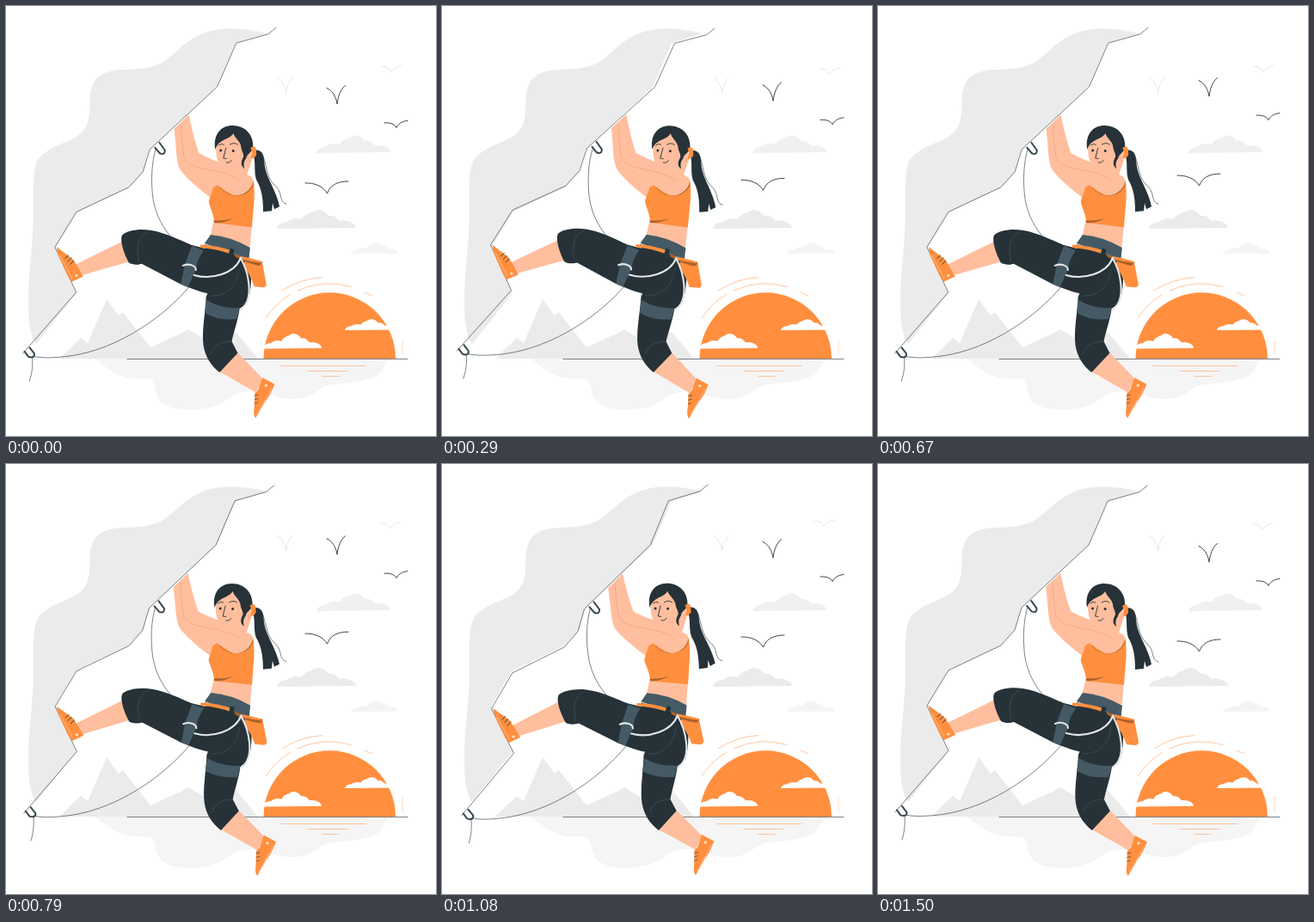
An HTML page for the animation above (1.54 s loop, 500 px wide and 500 px high).

```html
<!DOCTYPE html>
<html lang="en">
<head>
<meta charset="utf-8">
<title>Climber at sunset</title>
<style>
html, body { margin: 0; width: 100%; height: 100%; overflow: hidden; background: #fff; }
svg { display: block; width: 100vw; height: 100vh; }
.line { fill: none; stroke: #263238; stroke-width: .6; stroke-linecap: round; stroke-linejoin: round; }
.bold { stroke-width: .9; }
.pale { stroke: #cfcfcf; stroke-width: .5; }
.glow { fill: none; stroke: #ff8f3f; stroke-width: .5; stroke-linecap: round; }
.skin { fill: #ffbe9d; }
.crease { fill: none; stroke: #e09a78; stroke-width: .5; stroke-linecap: round; }
.dark { fill: #263238; }
.slate { fill: #455a64; }
.orange { fill: #ff8f3f; }
.brown { fill: #ad6128; }
.strap { fill: none; stroke: #e3e6e8; stroke-width: 2.1; stroke-linecap: round; }
.clip { fill: none; stroke: #37474f; stroke-width: 2; stroke-linecap: round; stroke-linejoin: round; }
</style>
</head>
<body>
<svg viewBox="0 0 500 500" xmlns="http://www.w3.org/2000/svg">
  <defs>
    <path id="cloud" d="M0,0 C1,-4 5,-8 12,-8 C17,-12 22,-13 29,-11 C32,-18 38,-17 42,-20 C48,-24 56,-21 60,-15 C67,-16 70,-12 73,-9 C82,-11 92,-6 92,-1 Z"/>
  </defs>

  <!-- scenery -->
  <path fill="#f5f5f5" d="M103,410 C123,426 138,436 160,433 C176,432 171,445 177,456 C184,470 215,473 240,466 C258,460 260,453 272,450 C300,442 312,462 345,456 C365,451 362,442 380,440 C410,438 432,433 437,425 C441,418 440,414 449,410 Z"/>
  <path fill="#ebebeb" d="M62,410 L87,386 L95,392 L117,341 L131,360 L136,356 L168,397 L203,381 L212,376 L232,388 L252,376 L268,380 L293,410 Z"/>
  <path class="orange" d="M299.5,410 A76.5,76.5 0 0 1 453,410 Z"/>
  <g class="glow">
    <path d="M302,363 A87,87 0 0 1 331,335"/>
    <path d="M339,331 A87,87 0 0 1 401,326.500"/>
    <path d="M417,333 L426,337"/>
    <path d="M321,331 A96,96 0 0 1 368,315.500"/>
    <path d="M320,418.500 H418 M351,424.500 H397 M368,430.500 H387"/>
    <path d="M461,388 V405" opacity=".6"/>
  </g>
  <g fill="#fff">
    <use href="#cloud" transform="translate(299 398.500) scale(.74 .8)"/>
    <use href="#cloud" transform="translate(394 377) scale(.64 .58)"/>
  </g>
  <use href="#cloud" transform="translate(361 171) scale(.94)" fill="#f0f0f0"/>
  <use href="#cloud" transform="translate(315 259)" fill="#ebebeb"/>
  <use href="#cloud" transform="translate(402 288) scale(.59)" fill="#f4f4f4"/>
  <path class="line" d="M141,410.500 H467"/>
  <path class="line pale" d="M316,83 C321,87 325,94 326,101 C326,95 328,89 333,84"/>
  <path fill="#ebebeb" d="M304,32 C285,27 262,25 243,28 C215,33 203,50 186,63 C172,73 155,73 137,74 C113,75 101,82 98,102 C96,122 100,137 86,149 C72,160 45,164 36,181 C30,196 32,220 32,245 C31,280 26,310 26,345 C26,368 29,386 35,393 L82,334 L57,281 L82,240 L143,211 L159,193 L167,167 L245,94 L267,43 Z"/>

  <g id="birds" class="line bold">
    <path d="M373,91 C380,94 384,102 385,109.500 C386,101 389,92 394.500,88"/>
    <path d="M440,131.500 C447,131 452,133 454,137 C456,133 460,129.500 467,129"/>
    <path d="M348,201.500 C358,201 369,205 373.500,213.500 C377,204 385,199.500 398,199.500"/>
  </g>

  <g id="sway">
    <path class="line pale" d="M436,70 C441,69 445,71 447,76 C450,72 454,69 459,69"/>
    <path class="line" d="M20,405 L82,333.500 L57,281 L82,240 L143,211 L159,193 L167,167 L245,94 L267,43 L304,32.500 L313,25"/>

    <!-- rope and clips -->
    <path class="line" d="M174,166 C169,182 168,205 171,225 C174,243 183,260 195,272 M213,327 C180,366 122,405 62,409 C50,410 40,410 31,408 C32,418 31,428 28,437"/>
    <path class="clip" d="M173,165 L178.500,171.500 Q184.500,174 184.500,168 L178,159"/>
    <path class="clip" d="M22,402.500 L26.500,408.500 Q34,411 33.500,405 L28,398"/>

    <!-- ponytail -->
    <path class="dark" d="M288,168 C295,165 300,172 300,181 C301,195 308,205 312,215 C315,222 317,228 318,233 L312,236 L310,229 L309,238 L299,239 C299,223 297,212 291,202 C288,193 290,183 288,175 Z"/>
    <path class="line" d="M297,170 C304,185 301,199 314,210 C322,218 317,228 326,230"/>

    <!-- far arm, waist and top -->
    <path class="skin" d="M195,143 L207,132 L222,178 L256,205 L241,225 C227,216 207,198 202,190 C197,180 198,163 195,143 Z"/>
    <path class="skin" d="M242,248 L286,254 L283,286 L237,270 Z"/>
    <path class="orange" d="M241,211 L252,205 L287,202 Q289,206 288.500,225 L286,257 L242,252 C242,240 234,229 236,226 Z"/>
    <path class="brown" d="M249,211 C262,226 281,221 288,204 C287,219 264,228 249,212 Z"/>
    <path class="brown" d="M242,249.500 Q254,250 264,247 Q253,253 242,252 Z"/>

    <!-- lower leg -->
    <path class="skin" d="M247,424 L270,403 L300,434 L291,449 Z"/>
    <path class="orange" d="M299,432 L313,439.500 Q308,453 302,460 L291,479 Q288,476 289.500,466 L290,450 L294,446 Z"/>
    <path class="line" d="M290,453 L294,452 M290,457.500 L294,456.500 M290,462 L293,461"/>
    <path class="line" style="stroke:#ffd6b5" d="M310,444 L293,474"/>
    <circle cx="303" cy="441" r="1.700" fill="#ffe0c6"/>

    <!-- leg on the wall -->
    <path class="skin" d="M136,274 L145,297 L87,314 L81,301 Z"/>
    <path class="orange" d="M59,281 L78,295 L83,303 L90,315 L77,321 Q73,318 69,308 L61,291 Z"/>
    <path class="line bold" d="M69,294 L73,290.500 M72,297.500 L76,293.500 M75,301 L79,297"/>
    <path class="line" style="stroke:#ffd6b5" d="M63,291 L77,317"/>
    <circle cx="82" cy="314" r="1.700" fill="#ffe0c6"/>

    <!-- trousers -->
    <path class="dark" d="M231,277 L282,294 C287,309 286,335 280,346 L272,352 C270,366 265,380 263,390 L270,403.500 L249,426 C239,418 232,408 230,394 C228,378 232,358 233,338 L238,327 Z"/>
    <path class="dark" d="M236,283 L216,278 C201,272 187,264 168,261 C154,259 139,262 135,267 C132,274 138,290 143,299 C148,302 155,301 158,300 L204,324 C219,330 236,337 251,336 C265,334 276,320 278,304 Z"/>
    <path class="line" style="stroke:#465961" d="M155,298 C151,282 153,268 166,262 M238,337 C260,338 270,321 271,306 M239,405 C241,395 250,390 263,390"/>
    <path class="slate" d="M233.500,342 Q250,352 272,351 L268.500,364 Q247,366 231.500,357 Z"/>
    <path class="slate" d="M216,279 L230,284 C226,290 222,297 222,304 L212,327 L203.500,323 L208,301 Z"/>
    <path class="slate" d="M238,266 Q262,268 284,281 L282.500,295 L231,276 Z"/>

    <!-- harness and bag -->
    <path class="orange" d="M278,296 L298,297 L303,323 Q303,327 299,327 L289,326 Q284,312 276,302 Z"/>
    <path class="brown" d="M266,288 L280,294 L298,297 Q298,303 291,301 Q277,298 266,291 Z"/>
    <path class="orange" d="M226,277.500 Q246,278 264,285 L263,289 Q245,282 226,281 Z"/>
    <path class="orange" d="M274,291 Q288,294 298,297 L297,298.500 Q284,297 273,294 Z"/>
    <rect class="dark" x="260" y="282" width="5" height="7" transform="rotate(18 262 285)"/>
    <path class="strap" d="M206,302 C213,299 221,302 221,307 M219,313 C239,319 266,311 273,293 C282,309 290,341 273,353"/>

    <!-- head -->
    <path class="skin" d="M245,157 C243,166 244,177 248,185 L262,195 L280,196 L286,178 L284,162 L265,145 Z"/>
    <path class="dark" d="M243,167 C240,149 250,139 263,139 C278,139 288,150 287,165 C285,171 280,171 279,177 C276,181 276,184 277,189 C272,185 273,181 276,175 C276,170 273,168 273,163 C271,156 266,154 264,148 C260,156 247,154 243,167 Z"/>
    <path class="orange" d="M284,165 Q289,161 290.500,166 L291,173 Q287,179 284.500,176 Q287,170 284,165 Z"/>
    <path class="line bold" d="M247,162 Q250,159 253,161 M260,161 Q265,158 269,161 M255.500,165 L252.500,177 L256,177.500 M256,182 Q260,183 262,179.500"/>
    <g class="dark"><circle cx="249.500" cy="168" r="1.500"/><circle cx="264" cy="168.500" r="1.500"/></g>
    <path class="crease" d="M281,177 Q284,174 283,181"/>

    <!-- near arm -->
    <path class="skin" d="M202,137 L212,126.500 C215,140 219,157 224,171 C237,179 263,186 286,199 Q289,206 282,214 Q272,223 262,219 Q253,214 244,207 L213,188 Q207,182 206,173 Z"/>
    <path class="crease" d="M203,138 C204,153 205,167 207,176 C210,184 217,186 224,188 C239,192 258,193 272,203"/>
  </g>
</svg>
<script>
const LOOP = 1540, LEAD = 50;
const sway = document.getElementById('sway');
const birds = document.getElementById('birds');

function draw(ms) {
  const phase = (ms + LEAD) / LOOP * 2 * Math.PI;
  sway.setAttribute('transform', `rotate(${Math.sin(phase).toFixed(4)} 250 250)`);
  birds.setAttribute('transform', `translate(0 ${(4.5 * Math.cos(phase)).toFixed(3)})`);
}

let start;
function tick(now) {
  start ??= now;
  draw((now - start) % LOOP);
  requestAnimationFrame(tick);
}
draw(0);
requestAnimationFrame(tick);
</script>
</body>
</html>
```
